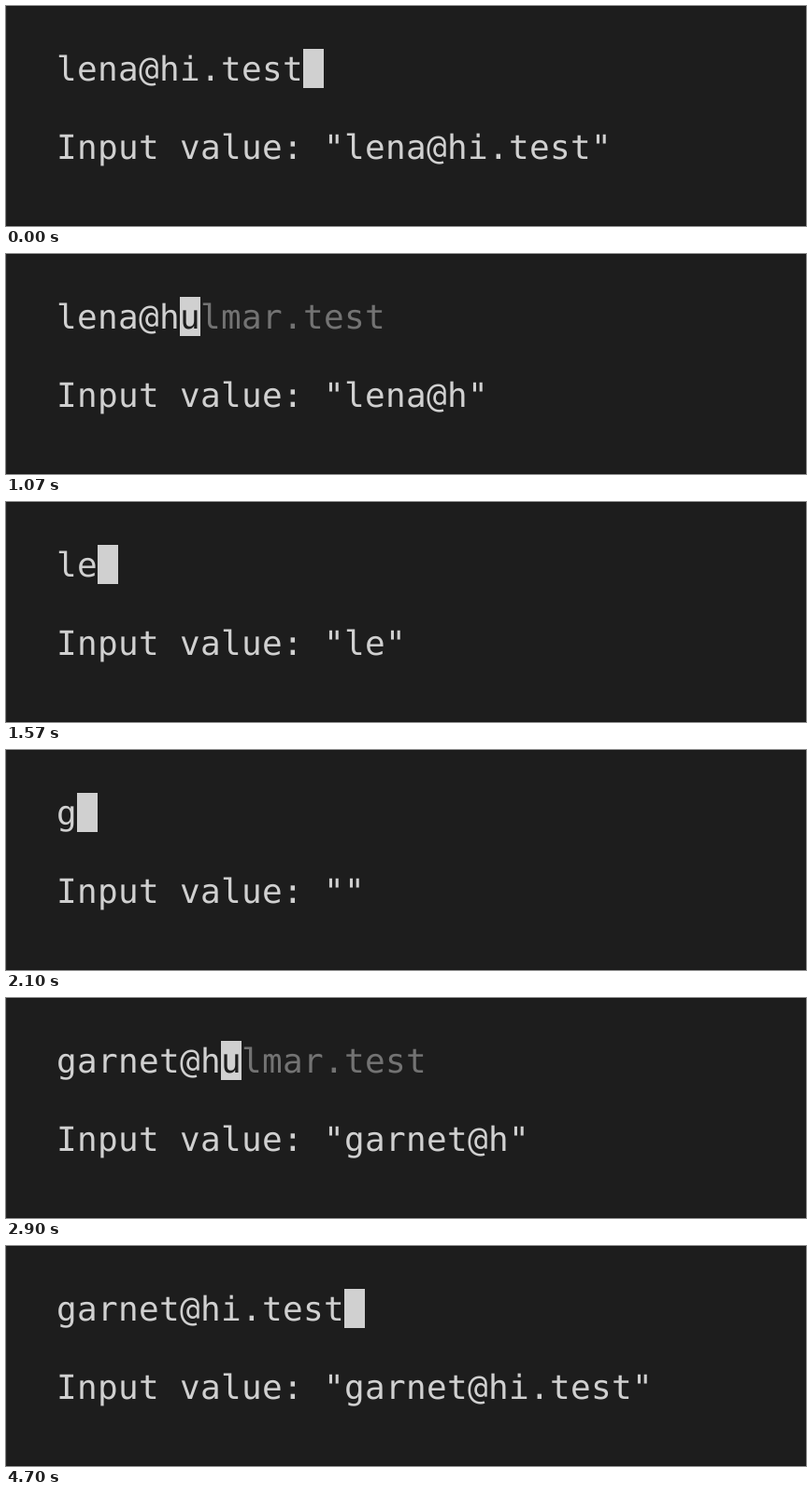
These frames come from a looping animation (856 by 236 pixels, 4980 ms). An HTML page:

```html
<!DOCTYPE html>
<html lang="en">
<head>
<meta charset="utf-8">
<title>Email input</title>
<style>
  html, body { margin: 0; width: 100%; height: 100%; overflow: hidden; background: #1d1d1d; }
  svg { display: block; width: 856px; height: 236px; }
  text {
    font: 36px "DejaVu Sans Mono", "Liberation Mono", monospace;
    letter-spacing: 0.327px;
    fill: #d0d0d0;
    white-space: pre;
    text-rendering: geometricPrecision;
  }
  #cursor { fill: #d0d0d0; }
  #under { fill: #1d1d1d; }
  #hint { fill: #737373; }
</style>
</head>
<body>
<svg viewBox="0 0 856 236">
  <rect width="856" height="236" fill="#191919"/>
  <rect y="1" width="856" height="234" fill="#1d1d1d"/>
  <rect width="1" height="236" fill="#282828"/>
  <text id="typed" x="54" y="80"></text>
  <rect id="cursor" y="46" width="22" height="42"/>
  <text id="under" y="80"></text>
  <text id="hint" y="80"></text>
  <text id="value" x="54" y="164"></text>
</svg>
<script>
const LOOP = 4980, LEFT = 54, CELL = 22;
const FIRST = "lena@hi.test", SECOND = "garnet@hi.test";
const DOMAINS = ["ox.test", "hulmar.test", "hi.test"];

// Bursts of key presses; times in ms
const burst = (start, gap, keys) => ({ start, gap, keys });
const ERASE = [burst(370, 133, 2), burst(670, 123, 4), burst(1200, 113, 4), burst(1700, 30, 2)];
const TYPE = [burst(2100, 123, 3), burst(2470, 50, 3), burst(2670, 200, 3)];
const TYPE_START = TYPE[0].start, SUBMIT = 3270;
// The echoed value follows each key, and the submit more slowly
const KEY_LAG = 30, SUBMIT_LAG = 160;

const el = id => document.getElementById(id);
const typed = el("typed"), cursor = el("cursor"), under = el("under");
const hint = el("hint"), value = el("value");

function presses(bursts, t) {
  return bursts.reduce((sum, { start, gap, keys }) =>
    sum + Math.min(keys, Math.max(0, Math.floor((t - start) / gap) + 1)), 0);
}

function textAt(t) {
  if (t < TYPE_START) return FIRST.slice(0, FIRST.length - presses(ERASE, t));
  return t < SUBMIT ? SECOND.slice(0, presses(TYPE, t)) : SECOND;
}

// The rest of the first domain that starts with what follows the @
function completion(text) {
  const part = text.split("@")[1];
  const match = DOMAINS.find(d => d.startsWith(part ?? d + "?"));
  return match ? match.slice(part.length) : "";
}

function place(node, column, text = "") {
  node.setAttribute("x", LEFT + column * CELL);
  node.textContent = text;
}

function draw() {
  const t = performance.now() % LOOP;
  const text = textAt(t);
  const echo = textAt(t - (t < SUBMIT ? KEY_LAG : SUBMIT_LAG));
  const rest = completion(text);
  typed.textContent = text;
  place(cursor, text.length);
  place(under, text.length, rest.slice(0, 1));
  place(hint, text.length + 1, rest.slice(1));
  value.textContent = `Input value: "${echo}"`;
  requestAnimationFrame(draw);
}
draw();
</script>
</body>
</html>
```
